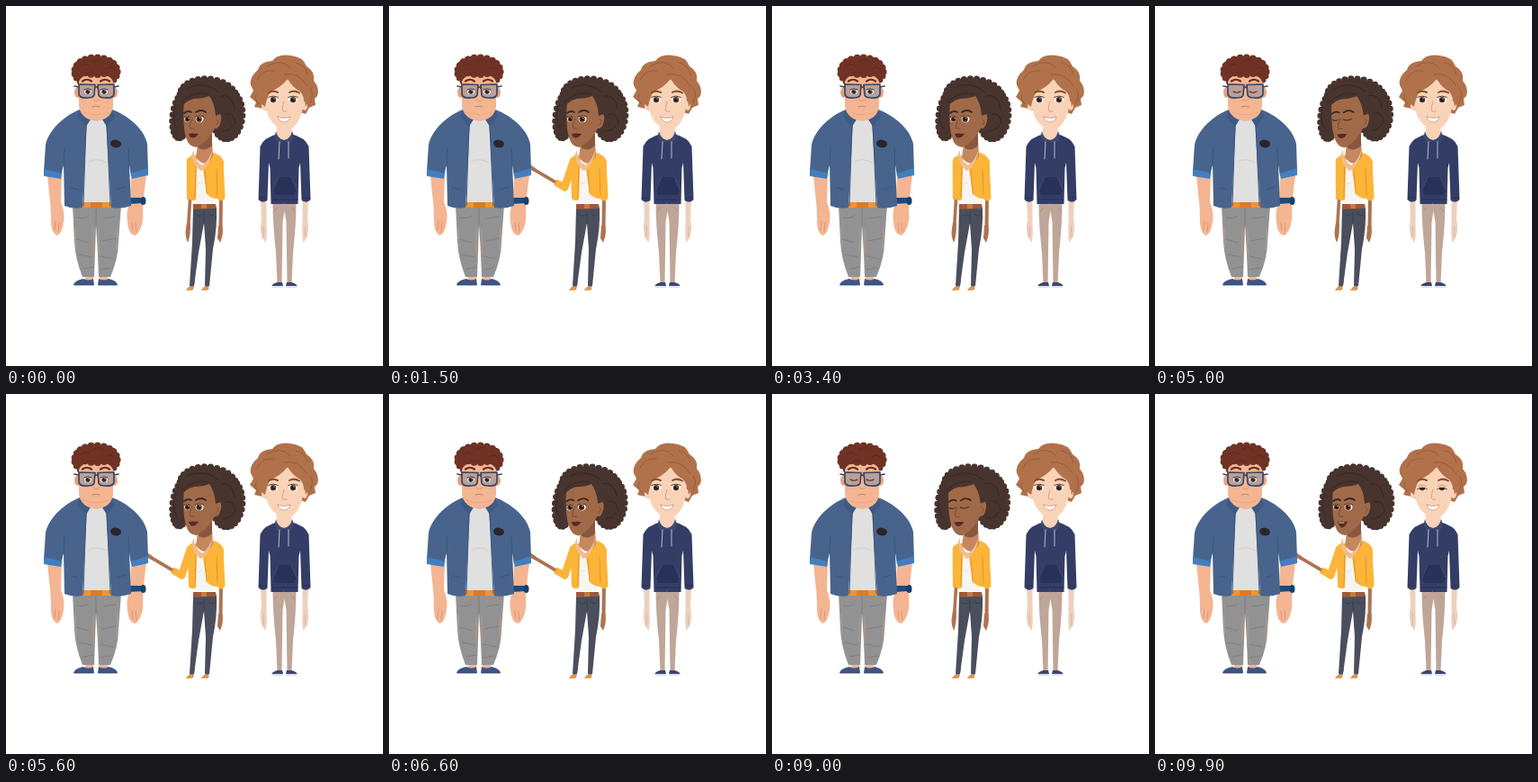
An HTML page with a canvas for the animation above (10 s loop, 419 by 400 pixels).

```html
<!DOCTYPE html>
<html lang="en">
<head>
<meta charset="utf-8">
<title>Three friends</title>
<style>
html, body { margin: 0; width: 100%; height: 100%; overflow: hidden; background: #fff; }
canvas { display: block; }
</style>
</head>
<body>
<canvas id="stage" width="419" height="400"></canvas>
<script>
const ctx = document.getElementById('stage').getContext('2d');
const LOOP = 10000, STEP = 100, CYCLE = 4000;

function fill(color, d) {
  ctx.fillStyle = color;
  ctx.fill(new Path2D(d));
}

function line(color, width, d) {
  ctx.strokeStyle = color;
  ctx.lineWidth = width;
  ctx.lineCap = ctx.lineJoin = 'round';
  ctx.stroke(new Path2D(d));
}

function oval(color, x, y, rx, ry = rx, turn = 0) {
  ctx.fillStyle = color;
  ctx.beginPath();
  ctx.ellipse(x, y, rx, ry, turn, 0, Math.PI * 2);
  ctx.fill();
}

// Ellipse with a curly rim
function curls(color, x, y, rx, ry, count, size, turn = 0) {
  oval(color, x, y, rx, ry, turn);
  for (let i = 0; i < count; i++) {
    const a = i / count * Math.PI * 2;
    const px = rx * Math.cos(a), py = ry * Math.sin(a);
    oval(color, x + px * Math.cos(turn) - py * Math.sin(turn),
      y + px * Math.sin(turn) + py * Math.cos(turn), size);
  }
}

function eye(x, y, rx, ry, shut, iris, lid, look = 0) {
  if (shut > 0.8) {
    line('#4a3029', 1.1, `M${x - rx} ${y} Q${x} ${y + 2.5} ${x + rx} ${y}`);
    return;
  }
  ctx.save();
  ctx.beginPath();
  ctx.ellipse(x, y, rx, ry, 0, 0, Math.PI * 2);
  ctx.clip();
  oval('#fff', x, y, rx, ry);
  oval(iris, x + look, y + 0.2, ry * 0.78);
  oval('#21140f', x + look, y + 0.2, ry * 0.45);
  oval('#fff', x + look + 1, y - 1, 0.6);
  ctx.fillStyle = lid;
  ctx.fillRect(x - rx, y - ry, rx * 2, ry * 2 * shut);
  ctx.restore();
  const top = y - ry + ry * 2 * shut;
  line('#3b2521', 0.9, `M${x - rx} ${top + 1.5} Q${x} ${top - 1} ${x + rx} ${top + 1.5}`);
}

const ramp = (x, a, b) => {
  const k = Math.min(1, Math.max(0, (x - a) / (b - a)));
  return k * k * (3 - 2 * k);
};
const blink = (u, mid) => Math.max(0, 1 - Math.abs(u - mid) / 180);

function bigMan(shut) {
  const skin = '#f4b592', blue = '#48648c', cuff = '#417fc0', hair = '#6f3325';
  // Arms
  fill(skin, 'M46 188 L62 188 L61 218 Q66 230 64 240 Q62 254 56 255 Q49 250 50 236 Q50 222 48 208 Z');
  fill(skin, 'M139 188 L156 188 Q153 210 152 226 Q154 246 144 255 Q136 254 135 240 Q133 229 138 216 Z');
  line('#d98b69', 0.8, 'M55 239 L54 249 M59 241 L58 251 M144 241 L145 251 M140 241 L141 250');
  fill('#1c4a7c', 'M136 213 L153 213 L153 219 L136 220 Z');
  oval('#15406f', 152.5, 216.5, 3, 4.5);

  // Trousers and shoes
  fill(skin, 'M88 298 L97 298 L97 306 L88 306 Z M104 298 L113 298 L113 306 L104 306 Z');
  fill('#929292', 'M74 221 L128 221 L125 262 Q125 280 116 301 L103 301 Q102 270 100 244 Q99 274 98 301 L85 301 Q77 281 76 262 Z');
  line('#7c7c7c', 0.9, 'M100 224 L100 244 M79 235 Q87 237 92 233 M78 259 L92 263 M81 276 L95 279 M86 292 L97 290 M109 236 L122 234 M107 261 L122 258 M105 278 L119 281 M105 293 L116 291');
  line('#c09a84', 0.9, 'M97 248 L97 275 M103 248 L103 276 M77 246 L78 267 M124 246 L123 270');
  fill('#3d5585', 'M86 303 Q92 306 97 303 L98 310 L75 310 Q76 305 86 303 Z M103 303 Q109 306 114 303 Q123 305 124 310 L102 310 Z');
  line('#2b3e66', 0.8, 'M76 310 L97 310 M103 310 L123 310');

  // Shirt, belt and jacket
  fill('#e0e0e0', 'M84 116 L117 116 L117 220 L83 220 Z');
  line('#cecece', 1, 'M92 173 Q101 168 111 174');
  fill('#ee923c', 'M83 218 L118 218 L118 224 L83 224 Z');
  fill('#d87b2d', 'M94 218 L107 218 L107 224 L94 224 Z');
  fill(blue, 'M82 115 C67 121 48 136 44 154 L42 184 L61 190 L64 176 L65 222 Q74 226 85 224 L90 128 Z');
  fill(blue, 'M118 115 C134 121 153 135 157 153 L158 183 L139 189 L137 176 L139 222 Q128 226 117 224 L111 128 Z');
  fill(cuff, 'M42 181 L62 186 L61 192 L42 189 Z M139 186 L158 180 L158 188 L140 192 Z');
  line('#38537c', 0.9, 'M64 178 L65 158 M137 178 L136 158 M89 130 L86 222 M112 130 L116 222 M72 202 L79 204 M124 204 L132 201');
  fill('#3f5a82', 'M83 114 L79 123 L89 134 L94 126 Z M117 114 L121 123 L112 134 L107 126 Z');
  oval('#29252a', 122, 153, 6, 4.4, 0.15);

  // Head
  curls(hair, 100, 73, 24, 16, 21, 3.6);
  oval('#e9a381', 80, 96, 4, 6);
  oval('#e9a381', 120, 96, 4, 6);
  fill(skin, 'M81 84 Q84 75 100 77 Q116 75 119 84 L119 111 Q118 125 101 128 Q83 126 81 111 Z');
  line('#e8a684', 0.9, 'M86 118 Q100 124 114 118');
  curls(hair, 100, 67, 20, 9, 17, 4);
  line('#5a271c', 0.8, 'M83 67 Q88 62 93 67 M97 62 Q104 56 109 63 M111 70 Q117 65 121 71 M89 76 Q95 71 100 76');
  line('#66301f', 2.2, 'M85 83.5 Q90 80 95 83.5 M105 83.5 Q110 80 115 83.5');
  const lens = 'M81 87 L99 87.5 L98 99 Q97 102 91 102 Q82 103 81 98 Z M102 87.5 L120 87 L120 98 Q119 103 110 102 Q104 102 103 99 Z';
  fill('#b9a099', lens);
  eye(91, 95, 4, 3.6, shut, '#5b5d69', '#bd9687');
  eye(109, 95, 4, 3.6, shut, '#5b5d69', '#bd9687');
  line('#3a4560', 1.7, lens + ' M76 89 L81 90 M99 91 Q101 89 102 91 M120 90 L125 89');
  line('#dc9473', 1, 'M97 104 Q100 107 104 104');
  line('#c07d67', 0.9, 'M96 112 Q100 110.5 104 112');
}

function woman(pose) {
  const skin = '#a06a49', limb = '#ad7350', yellow = '#fcb439', hair = '#48342f';
  // Legs
  fill(limb, 'M206 305 L210 305 L208 315 L200 316 Q203 312 205 311 Z M222 305 L226 305 L225 315 L217 316 Q220 312 222 311 Z');
  fill('#e39b4e', 'M205 312 L208 312 L207 316 L200 316 Z M222 312 L225 312 L224 316 L217 316 Z');
  fill('#4a4e5d', 'M208 224 L234 224 Q235 246 230 270 L226 311 L221 311 L222 270 L220 241 L214 274 L209 311 L204 311 L207 263 Z');
  line('#383b48', 0.9, 'M220 229 L220 242 M211 231 Q214 235 218 232 M225 231 Q229 235 232 231');

  // Far arm
  line(limb, 4, 'M239 211 L238.5 246');
  fill(limb, 'M236 244 L240.5 244 Q242 254 238 263 L235 258 Z');
  line(yellow, 9, 'M237 174 L239 212');

  // Near arm: the elbow bends as the shoulder swings out
  ctx.save();
  ctx.translate(205, 172);
  ctx.rotate(0.32 * pose.arm);
  ctx.save();
  ctx.translate(0, 31);
  ctx.rotate(0.03 + 1.72 * pose.arm);
  line(limb, 3.6, 'M0 8 L-1 40');
  fill(limb, 'M-3 38 L1 38 Q2 51 -1 60 Q-4 55 -4 48 Z');
  line(yellow, 8, 'M0 0 L0 8');
  line('#df9527', 0.9, 'M-3.5 11 L3.5 11');
  ctx.restore();
  line(yellow, 8.5, 'M0 0 L0 31');
  ctx.restore();

  // Torso
  fill('#f7f5f2', 'M209 173 L225 173 L231 219 L209 219 Z');
  fill(yellow, 'M206 166 Q201 169 202 181 L203 214 Q207 218 211 215 L212 180 L213 166 Z');
  fill(yellow, 'M227 162 Q239 164 242 173 L241 213 Q232 217 223 209 L219 181 Z');
  line('#dd9426', 0.9, 'M211 179 L210 213 M221 183 L223 208 M234 181 L235 210');
  line('#e3ded7', 0.8, 'M213 198 L218 196');
  fill('#9c5a3a', 'M208 220 L233 220 L234 225 L208 226 Z');
  fill('#c77b43', 'M217 220 L223 220 L223 225 L217 225 Z');

  fill('#c4875f', 'M213 154 L229 150 L230 167 Q221 182 211 168 Z');
  fill('#89573d', 'M214 142 L229 139 L229 155 Q222 162 214 158 Z');
  fill('#f0bd91', 'M209 160 Q208 171 218 177 Q226 172 230 158 L228 168 Q222 182 216 183 Q206 174 207 164 Z');

  // Head
  ctx.save();
  ctx.translate(222, 160);
  ctx.rotate(pose.tilt);
  ctx.translate(-222, -160);
  curls(hair, 225, 102, 32, 21, 28, 3.6, 0.12);
  curls(hair, 246, 121, 17, 27, 26, 3.4, 0.05);
  curls(hair, 195, 122, 10, 25, 22, 3.4, 0.12);
  fill(skin, 'M198 104 Q208 94 229 99 L237 119 Q241 122 238 131 Q236 137 232 136 Q225 150 212 157 Q203 157 200 146 Q196 133 198 104 Z');
  fill(hair, 'M192 118 Q198 105 209 103 Q219 103 226 100 Q232 108 233 122 L241 119 L240 90 L211 84 Q195 94 192 118 Z');
  line('#35241f', 0.9, 'M195 107 Q209 93 225 98 M202 91 Q221 82 237 96 M239 100 Q251 97 254 114 M244 120 Q254 117 255 131 M188 111 Q183 126 190 136 M241 139 Q249 139 253 132');
  line('#3c2921', 1.8, 'M198 119 Q202 115.5 206 118 M211 118 Q217 114 222 118');
  eye(201.5, 125.5, 3.4, 3.8, pose.shut, '#60351f', '#8d5b3f', 0.3);
  eye(215, 125.5, 4.6, 4.1, pose.shut, '#60351f', '#8d5b3f', -0.4);
  line('#7d4c34', 1, 'M207 125 Q203 133 205 136 L209 136');
  line('#7d4c34', 0.9, 'M234 126 Q238 128 234 132');
  fill('#552a26', `M203 142 Q207 141 214 142 Q211 ${146.5 + pose.talk} 207 ${146.5 + pose.talk} Q204 146 203 142 Z`);
  if (pose.talk > 1) line('#e4d4ca', 1, 'M205 143 L210 143');
  ctx.restore();
}

function slimMan(shut) {
  const skin = '#f9d3b8', pale = '#edd0bd', navy = '#333d66', hair = '#b1724b';
  // Limbs and hoodie, mirrored about the middle
  for (const side of [-1, 1]) {
    ctx.save();
    ctx.translate(309.5, 0);
    ctx.scale(side, 1);
    fill(pale, 'M20 216 L26.5 216 L25.5 237 Q28 247 25 257 L21 263 Q19 255 20 242 Z');
    line('#d4ad97', 0.8, 'M23 245 L23.5 257');
    fill('#bfa698', 'M-1 218 L13 218 Q13 243 9.5 274 L8 308 L3 308 L2 240 L0 228 L-1 228 Z');
    line('#a38d80', 0.8, 'M8 224 L11 228');
    fill('#3c466f', 'M2.5 307 L8 307 Q14 309 14 311 L1.5 311 Z');
    line('#a9b2cb', 0.8, 'M2 312 L13.5 312');
    fill(navy, 'M7 142 Q23 146 27 156 L29 215 Q25 220 19 216 L17.5 174 L16 180 L15 220 L-1 220 L-1 145 Z');
    line('#262f54', 0.9, 'M20 213 L28 213');
    ctx.restore();
  }

  fill('#283157', 'M303 190 L317 190 L323 205 L320 210 L299 210 L297 204 Z');
  line('#465079', 0.8, 'M303 190 L297 204 M317 190 L323 204');
  line('#262f54', 1, 'M296 215 L324 215');
  fill(skin, 'M301 130 L317 130 L318 144 Q309 154 301 144 Z');
  fill('#3f4970', 'M300 139 Q297 148 303 153 L309 150 L315 153 Q322 147 318 139 Q316 148 309 149 Q302 148 300 139 Z');
  line('#b7bccb', 1, 'M304 151 L303 170 M314 151 L314 169');

  // Head
  fill(hair, 'M275 94 L272 88 Q270 79 280 71 Q282 62 296 61 Q302 53 316 55 Q330 56 334 67 Q344 73 342 83 Q349 91 346 100 L343 103 L344 110 L337 113 L333 120 L324 117 L292 117 L285 114 L276 112 L278 107 L271 101 Z');
  fill(skin, 'M288 86 Q309 77 330 86 L331 108 Q328 127 320 134 Q310 142 301 134 Q289 125 288 107 Z');
  oval(skin, 287, 111, 3, 5);
  oval(skin, 332, 111, 3, 5);
  fill(hair, 'M284 109 Q279 91 286 76 Q301 62 320 73 Q332 78 337 91 Q338 105 333 112 Q332 101 327 95 Q319 91 313 81 Q305 91 294 95 Q290 101 288 112 Z');
  line('#935a38', 0.9, 'M279 82 Q285 70 298 72 M290 67 Q306 57 316 69 M310 76 Q325 73 335 89 M322 63 Q333 65 335 76 M278 98 Q275 104 281 109 M338 91 Q343 97 338 108');
  line('#875030', 2, 'M292 96.5 Q296 93 302 96 M315 96 Q320 93 326 96.5');
  eye(297, 104, 5.2, 4.2, shut, '#5e4030', '#e9b996');
  eye(319, 104, 5.2, 4.2, shut, '#5e4030', '#e9b996');
  line('#daa37f', 1, 'M309 106 Q306 116 308 117 L312 117');
  const smile = 'M302 123 Q309 126 316 123 Q314 129 309 129 Q304 129 302 123 Z';
  fill('#fff', smile);
  line('#c98672', 0.7, smile);
}

function draw(ms) {
  const t = Math.floor((ms % LOOP) / STEP) * STEP;
  const u = (t + 600) % CYCLE;
  const nod = ramp(u, 1150, 1550) * (1 - ramp(u, 1700, 2050));
  const lean = ramp(u, 2800, 3150) * (1 - ramp(u, 3350, 3800));
  ctx.fillStyle = '#fff';
  ctx.fillRect(0, 0, 419, 400);
  slimMan(blink(u, 2590));
  woman({
    arm: ramp(u, 1650, 2050) * (1 - ramp(u, 3350, 3850)),
    tilt: -0.032 * nod - 0.018 * lean,
    shut: blink(u, 1600),
    talk: 2 * ramp(u, 2150, 2450) * (1 - ramp(u, 2600, 2900))
  });
  bigMan(blink(u, 1600));
}

let start;
function tick(now) {
  start ??= now;
  draw(now - start);
  requestAnimationFrame(tick);
}
draw(0);
requestAnimationFrame(tick);
</script>
</body>
</html>
```
